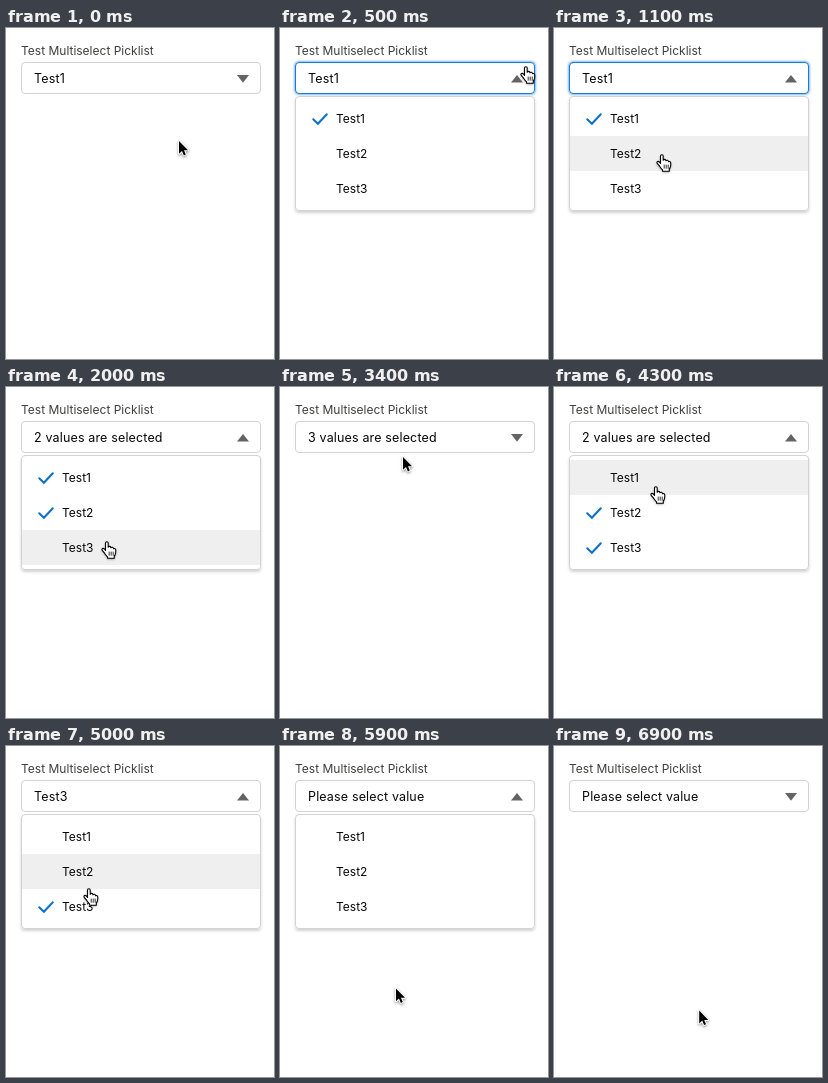
Write an HTML page with a canvas that moves like this. It is 268 px wide and 331 px high and loops after 7 s.

```html
<!DOCTYPE html>
<html lang="en">
<head>
<meta charset="utf-8">
<title>Multiselect picklist</title>
<style>
  html, body { margin: 0; width: 100%; height: 100%; overflow: hidden; background: #fff; }
  canvas { display: block; width: 268px; height: 331px; }
</style>
</head>
<body>
<canvas></canvas>
<script>
const W = 268, H = 331, LOOP = 7000, STEP = 100;
const FONT = 'Inter, Roboto, sans-serif';
const canvas = document.querySelector('canvas');
const ctx = canvas.getContext('2d');
const ratio = window.devicePixelRatio || 1;
canvas.width = W * ratio;
canvas.height = H * ratio;

const OPTIONS = ['Test1', 'Test2', 'Test3'];
const ROW_TOP = 73, ROW_H = 35;

// Pointer moves: first step time, number of steps, end x, end y
const START = [173, 113];
const MOVES = [
  [100, 3, 240, 38],
  [700, 5, 102, 126],
  [1800, 3, 95, 154],
  [2800, 3, 119, 254],
  [3200, 3, 123, 70],
  [3500, 1, 123, 51],
  [3900, 3, 96, 99],
  [4500, 2, 82, 123],
  [5000, 1, 77, 142],
  [5100, 2, 73, 161],
  [5800, 3, 131, 271],
  [6400, 1, 130.5, 270.5],
  [6900, 1, 145.2, 264.6]
];
const OPEN = [[500, 3100], [3700, 6100]];
const FOCUS = [[400, 1400], [3600, 4200]];
const TOGGLES = [[1600, 1], [2500, 2], [4300, 0], [4800, 1], [5400, 2]];

const ARROW = new Path2D('M0 0V12.8L3 10L4.9 14.4L6.8 13.6L5 9.3H9.1Z');
const HAND = new Path2D('M4.5 9.5V2Q4.5 .7 5.9 .7Q7.2 .7 7.2 2V6.3Q7.6 5.3 8.7 5.4' +
  'Q9.8 5.5 9.9 6.8Q10.5 6 11.5 6.3Q12.5 6.6 12.5 7.8Q13.3 7.2 14.1 7.8Q14.9 8.4 14.8 9.8' +
  'L14.6 12Q14.3 14 13.3 15V17.3H6.6L6.5 15.8Q4.6 14 3.6 12.2L1.2 9.4Q.5 8.2 1.4 7.5Q2.4 7 3.4 8Z');
const CREASES = new Path2D('M8.2 11V14.3M10.2 11V14.3M12.2 11V14.3');

const clamp = v => Math.max(0, Math.min(1, v));
const smooth = v => v * v * (3 - 2 * v);

function pointerAt(t) {
  let [x, y] = START;
  for (const [from, steps, toX, toY] of MOVES) {
    if (t < from) break;
    const k = smooth(clamp(((t - from) / STEP + 1) / steps));
    x += (toX - x) * k;
    y += (toY - y) * k;
  }
  return { x, y };
}

function focusAt(t) {
  return Math.max(...FOCUS.map(([on, off]) =>
    clamp(Math.min((t - on + STEP) / 200, (off + STEP - t) / 200))));
}

function checkedAt(t) {
  const on = [true, false, false];
  for (const [when, i] of TOGGLES) if (t >= when) on[i] = !on[i];
  return on;
}

function summary(on) {
  const picked = OPTIONS.filter((_, i) => on[i]);
  if (!picked.length) return 'Please select value';
  return picked.length === 1 ? picked[0] : picked.length + ' values are selected';
}

function text(str, x, y, size, color, spacing = 0) {
  ctx.font = size + 'px ' + FONT;
  ctx.letterSpacing = spacing + 'px';
  ctx.fillStyle = color;
  ctx.fillText(str, x, y);
}

function box(x, y, w, h, r) {
  ctx.beginPath();
  ctx.roundRect(x, y, w, h, r);
}

function shadow(color, blur, dy) {
  ctx.shadowColor = color;
  ctx.shadowBlur = blur * ratio;
  ctx.shadowOffsetY = dy * ratio;
}

function drawInput(label, open, focus) {
  ctx.save();
  box(15, 34, 240, 32, 4);
  if (focus) shadow(`rgba(0,112,210,${focus})`, 3, 0);
  ctx.fillStyle = '#fff';
  ctx.fill();
  ctx.restore();

  box(15.5, 34.5, 239, 31, 3.5);
  ctx.lineWidth = 1;
  ctx.strokeStyle = '#d5d3d2';
  ctx.stroke();
  if (focus) {
    ctx.strokeStyle = `rgba(21,125,220,${focus})`;
    ctx.stroke();
  }
  text(label, 28, 55, 12.5, '#080707', 0.15);

  const [base, tip] = open ? [54.5, 47] : [47, 54.7];
  ctx.beginPath();
  ctx.moveTo(231, base);
  ctx.lineTo(243, base);
  ctx.lineTo(237, tip);
  ctx.closePath();
  ctx.fillStyle = '#666462';
  ctx.fill();
}

function drawCheck(y) {
  ctx.beginPath();
  ctx.moveTo(33.2, y + 0.8);
  ctx.lineTo(37.9, y + 5.3);
  ctx.lineTo(46.8, y - 4.2);
  ctx.lineWidth = 2;
  ctx.lineCap = 'round';
  ctx.strokeStyle = '#0b6fcb';
  ctx.stroke();
}

function drawMenu(on, hover) {
  ctx.save();
  box(15, 68, 240, 115, 4);
  shadow('rgba(0,0,0,.18)', 3, 2);
  ctx.fillStyle = '#fff';
  ctx.fill();
  ctx.restore();
  box(15.5, 68.5, 239, 114, 3.5);
  ctx.lineWidth = 1;
  ctx.strokeStyle = '#d5d3d2';
  ctx.stroke();

  OPTIONS.forEach((name, i) => {
    const top = ROW_TOP + i * ROW_H;
    if (i === hover) {
      ctx.fillStyle = '#efefef';
      ctx.fillRect(16, top, 238, ROW_H);
    }
    if (on[i]) drawCheck(top + 17.5);
    text(name, 56, top + 22, 12, '#080707');
  });
}

function drawPointer({ x, y }, hand) {
  ctx.save();
  ctx.translate(x, y);
  ctx.lineJoin = 'round';
  ctx.save();
  shadow('rgba(0,0,0,.45)', 2.5, 1);
  ctx.lineWidth = 2;
  ctx.strokeStyle = ctx.fillStyle = '#fff';
  if (hand) ctx.fill(HAND);
  else ctx.stroke(ARROW);
  ctx.restore();
  if (hand) {
    ctx.lineWidth = 1.1;
    ctx.strokeStyle = '#000';
    ctx.stroke(HAND);
    ctx.lineWidth = 0.8;
    ctx.stroke(CREASES);
  } else {
    ctx.fillStyle = '#000';
    ctx.fill(ARROW);
  }
  ctx.restore();
}

function draw(t) {
  const open = OPEN.some(([a, b]) => t >= a && t < b);
  const on = checkedAt(t);
  const pos = pointerAt(t);
  const hotX = pos.x + 5, hotY = pos.y + 0.5;
  const inside = hotX >= 15 && hotX <= 255;
  const hand = inside && hotY >= 34 && hotY <= (open ? 183 : 66);
  const hover = hand ? Math.floor((hotY - ROW_TOP) / ROW_H) : -1;

  ctx.setTransform(ratio, 0, 0, ratio, 0, 0);
  ctx.fillStyle = '#fff';
  ctx.fillRect(0, 0, W, H);
  text('Test Multiselect Picklist', 15, 27, 12, '#3e3e3c');
  drawInput(summary(on), open, focusAt(t));
  if (open) drawMenu(on, hover);
  drawPointer(pos, hand);
}

const begin = performance.now();
function tick() {
  const t = (performance.now() - begin) % LOOP;
  draw(Math.floor(t / STEP) * STEP);
  requestAnimationFrame(tick);
}
tick();
</script>
</body>
</html>
```
